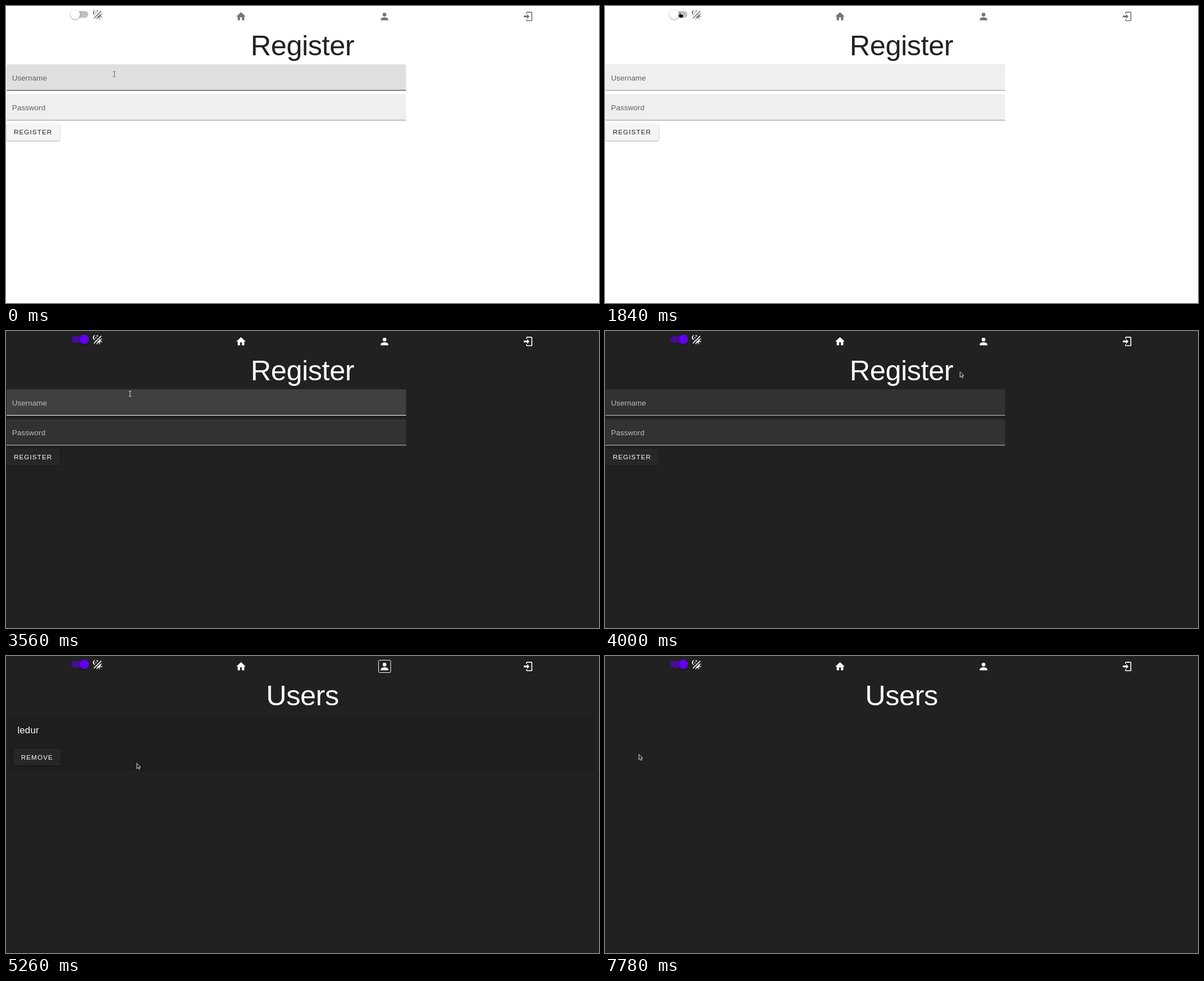
Write an HTML page that moves like this. It is 1056x530 px and loops after 8 s.

```html
<!DOCTYPE html>
<html lang="en">
<head>
<meta charset="utf-8">
<title>Register and users</title>
<style>
html, body { margin: 0; width: 100%; height: 100%; overflow: hidden; }
svg { display: block; width: 1056px; height: 530px; background: var(--bg); }
text { font-family: "Liberation Sans", Arial, sans-serif; fill: var(--text); white-space: pre; }
.title { font-size: 50.4px; letter-spacing: -.42px; text-anchor: middle; }
.label { font-size: 13.44px; letter-spacing: .06px; fill: var(--label); }
.caps { font-size: 11.76px; letter-spacing: 1.05px; }
.name { font-size: 16.8px; letter-spacing: .21px; }
.icon { fill: var(--icon); }
.button { fill: var(--button); filter: drop-shadow(0 1.5px 1.2px #0005); }
.card { fill: #1e1e1e; filter: drop-shadow(0 1.5px 1.2px #0005); }
.field { fill: var(--field); }
.line { fill: var(--line); }
.hover .field { fill: var(--fieldHover); }
.hover .line { fill: var(--lineHover); }
#thumb { filter: drop-shadow(0 1.5px 1.5px #0006); }
#cursor path { stroke-linejoin: round; }
</style>
</head>
<body>
<svg id="stage" viewBox="0 0 1056 530">
  <rect id="track" x="116.4" y="9.1" width="30.2" height="11.8" rx="5.9"/>
  <circle id="halo" cy="15" r="16.8"/>
  <circle id="thumb" cy="15" r="8.4"/>
  <g class="icon">
    <path transform="translate(153 5.4) scale(.84)" d="M7.5 2C5.7 3.15 4.5 5.2 4.5 7.5S5.7 11.85 7.53 13A5.5 5.5 0 0 1 7.5 2M19.07 3.5L20.5 4.93 4.93 20.5 3.5 19.07zM12.9 5.93L11.4 5 9.97 6l.42-1.7L9 3.24l1.75-.12.58-1.65L12 3.1l1.73.03-1.35 1.13zM9.6 9.54L8.43 8.8l-1.12.78.34-1.32-1.09-.83 1.36-.09.45-1.29.51 1.27 1.36.03-1.05.87zM19 13.5A5.5 5.5 0 0 1 10.24 17.93L17.93 10.24Q19 11.7 19 13.5M14.6 20.08l2.77-1.15-.24 3.35zM18.93 17.38l1.15-2.77 2.2 2.54zM20.08 12.42l-1.14-2.78 3.34.24zM9.63 18.93l2.77 1.15-2.53 2.19z"/>
    <path transform="translate(408.4 8.6) scale(.84)" d="M10 20v-6h4v6h5v-8h3L12 3 2 12h3v8z"/>
    <path transform="translate(664 8.6) scale(.84)" d="M12 4a4 4 0 1 1 0 8 4 4 0 0 1 0-8m0 10c4.42 0 8 1.79 8 4v2H4v-2c0-2.21 3.58-4 8-4z"/>
    <path transform="translate(919.6 8.6) scale(.84)" d="M10 17v-3H3v-4h7V7l5 5zM10 2h9a2 2 0 0 1 2 2v16a2 2 0 0 1-2 2h-9a2 2 0 0 1-2-2v-2h2v2h9V4h-9v2H8V4a2 2 0 0 1 2-2z"/>
  </g>
  <rect id="ring" x="663.5" y="7.5" width="21.5" height="22" rx="2" fill="none" stroke="#fff"/>
  <text id="title" class="title" x="528" y="88"></text>

  <g id="form">
    <g id="username">
      <path class="field" d="M1 151v-43.6q0-3.4 3.4-3.4h704.7q3.4 0 3.4 3.4V151z"/>
      <rect class="line" x="1" y="150" width="711.5" height="1"/>
      <text class="label" x="10.7" y="133">Username</text>
    </g>
    <g transform="translate(0 53.3)">
      <path class="field" d="M1 151v-43.6q0-3.4 3.4-3.4h704.7q3.4 0 3.4 3.4V151z"/>
      <rect class="line" x="1" y="150" width="711.5" height="1"/>
      <text class="label" x="10.7" y="133">Password</text>
    </g>
    <rect class="button" x=".8" y="210" width="95" height="30.2" rx="3.4"/>
    <text class="caps" x="13.9" y="229.4">REGISTER</text>
  </g>

  <g id="users">
    <rect class="card" x="7" y="105" width="1040" height="97.5" rx="3.4"/>
    <rect id="selection" y="119" height="26.5" fill="#0b5fd7"/>
    <text class="name" x="20.4" y="137.7">ledur</text>
    <rect class="button" x="13.5" y="165.3" width="84" height="30" rx="3.4"/>
    <text class="caps" x="26.7" y="184.5">REMOVE</text>
  </g>

  <g id="cursor">
    <path id="arrow" d="M0 0v9.6l2.3-2 1.7 3.4 1.7-.9-1.7-3.2h2.8z" fill="#222" stroke="#eee" stroke-width=".9"/>
    <path id="beam" d="M-2.3-4.5H2.3M-2.3 4.5H2.3M0-4.5V4.5" fill="none" stroke-width="1.1"/>
    <path id="hand" d="M-1 0h2v2.8l4.5 1v3.4l-1 1.8H0L-3.4 4.4l1-1L-1 4.5z" fill="#000" stroke="#ddd" stroke-width=".5"/>
  </g>
</svg>
<script>
const LOOP = 8000, DARK = 2640, CLICK = 4500, USERS = 4620, PRESS = 6080, REMOVED = 7700;
const ANCHOR = 53, NAME_LEFT = 20.5;
const LETTERS = [20.5, 24.5, 34, 43.5, 53, 58.8];

// time, x, y of the pointer's hot spot
const PATH = [
  [1220, 193, 121.5], [1840, 133.5, 12],
  [3340, 133.5, 12], [3560, 220, 112], [3780, 430, 120], [4000, 632, 73],
  [4180, 664, 40], [4340, 680, 19],
  [4980, 680, 19], [5260, 233.5, 191.5], [5460, 110, 175], [5640, 52.5, 132],
  [6300, 52.5, 132], [6560, 59.8, 130.5], [6660, 59.8, 130.5], [6880, 20, 131],
  [7160, 20, 131], [7480, 60.3, 175.3]
];

const el = id => document.getElementById(id);
const clamp = v => Math.min(1, Math.max(0, v));
const lerp = (a, b, p) => a + (b - a) * p;
const mix = (a, b, p) => `rgb(${a.map((v, i) => Math.round(lerp(v, b[i], p)))})`;
const gray = (a, b, p) => mix([a, a, a], [b, b, b], p);
const show = (id, on) => el(id).style.display = on ? "" : "none";
const set = (id, attrs) => Object.entries(attrs).forEach(([k, v]) => el(id).setAttribute(k, v));

function pointer(t) {
  const i = PATH.findIndex(k => k[0] > t);
  if (i === 0) return PATH[0].slice(1);
  if (i < 0) return PATH.at(-1).slice(1);
  const [t0, x0, y0] = PATH[i - 1], [t1, x1, y1] = PATH[i];
  const p = (t - t0) / (t1 - t0);
  return [lerp(x0, x1, p), lerp(y0, y1, p)];
}

function pointerShape(t, x, y) {
  const over = (l, top, r, b) => x >= l && x <= r && y >= top && y <= b;
  if (over(115, 6, 148, 24) || over(663, 7, 685, 30)) return "hand";
  if (t < USERS) return over(1, 104, 712, 204) || over(436, 46, 620, 100) ? "beam" : "arrow";
  if (t < REMOVED && over(13, 165, 97, 195)) return "hand";
  return t < REMOVED && over(20.5, 119, 58.5, 145) ? "beam" : "arrow";
}

function theme(dark, p) {
  const colors = dark ? {
    bg: "#212121", text: "#fff", button: "#272727", field: "#323232", fieldHover: "#404040",
    icon: gray(24, 255, p), label: gray(26, 188, p), line: gray(26, 200, p), lineHover: "#fff"
  } : {
    bg: "#fff", text: "#212121", button: "#f5f5f5", field: "#efefef", fieldHover: "#dfdfdf",
    icon: "#757575", label: "#606060", line: "#8c8c8c", lineHover: "#2a2a2a"
  };
  for (const name in colors) el("stage").style.setProperty("--" + name, colors[name]);
}

function drawSwitch(t, dark, p) {
  const cx = lerp(123.3, 139.7, p), purple = mix([255, 255, 255], [98, 0, 238], p);
  set("thumb", { cx, fill: purple });
  set("track", { fill: dark ? mix([100, 27, 198], [68, 15, 144], p) : "#bfbfbf" });
  set("halo", { cx, fill: purple, opacity: lerp(.2, .1, clamp((t - DARK) / 260)) });
  show("halo", dark && t < 3400);
}

function drawSelection(t, x) {
  const nearest = LETTERS.reduce((a, b) => Math.abs(b - x) < Math.abs(a - x) ? b : a);
  const caret = t < PRESS ? ANCHOR : Math.max(NAME_LEFT, nearest);
  const end = t > 6880 ? NAME_LEFT : caret;
  set("selection", { x: Math.min(ANCHOR, end), width: Math.abs(end - ANCHOR) });
}

function draw(t) {
  const dark = t >= DARK, onUsers = t >= USERS;
  const p = dark ? clamp(.32 + (t - DARK) / 130) : 0;
  const [x, y] = pointer(t), shape = pointerShape(t, x, y);
  theme(dark, p);
  drawSwitch(t, dark, p);
  drawSelection(t, x);
  el("title").textContent = onUsers ? "Users" : "Register";
  show("form", !onUsers);
  show("users", onUsers && t < REMOVED);
  show("ring", t >= CLICK && t < PRESS);
  el("username").classList.toggle("hover", y > 104 && y < 151);
  set("cursor", { transform: `translate(${x} ${y})` });
  set("beam", { stroke: dark ? "#ccc" : "#666" });
  for (const id of ["arrow", "beam", "hand"]) show(id, id === shape);
}

const start = performance.now();
function tick() {
  draw((performance.now() - start) % LOOP);
  requestAnimationFrame(tick);
}
tick();
</script>
</body>
</html>
```
